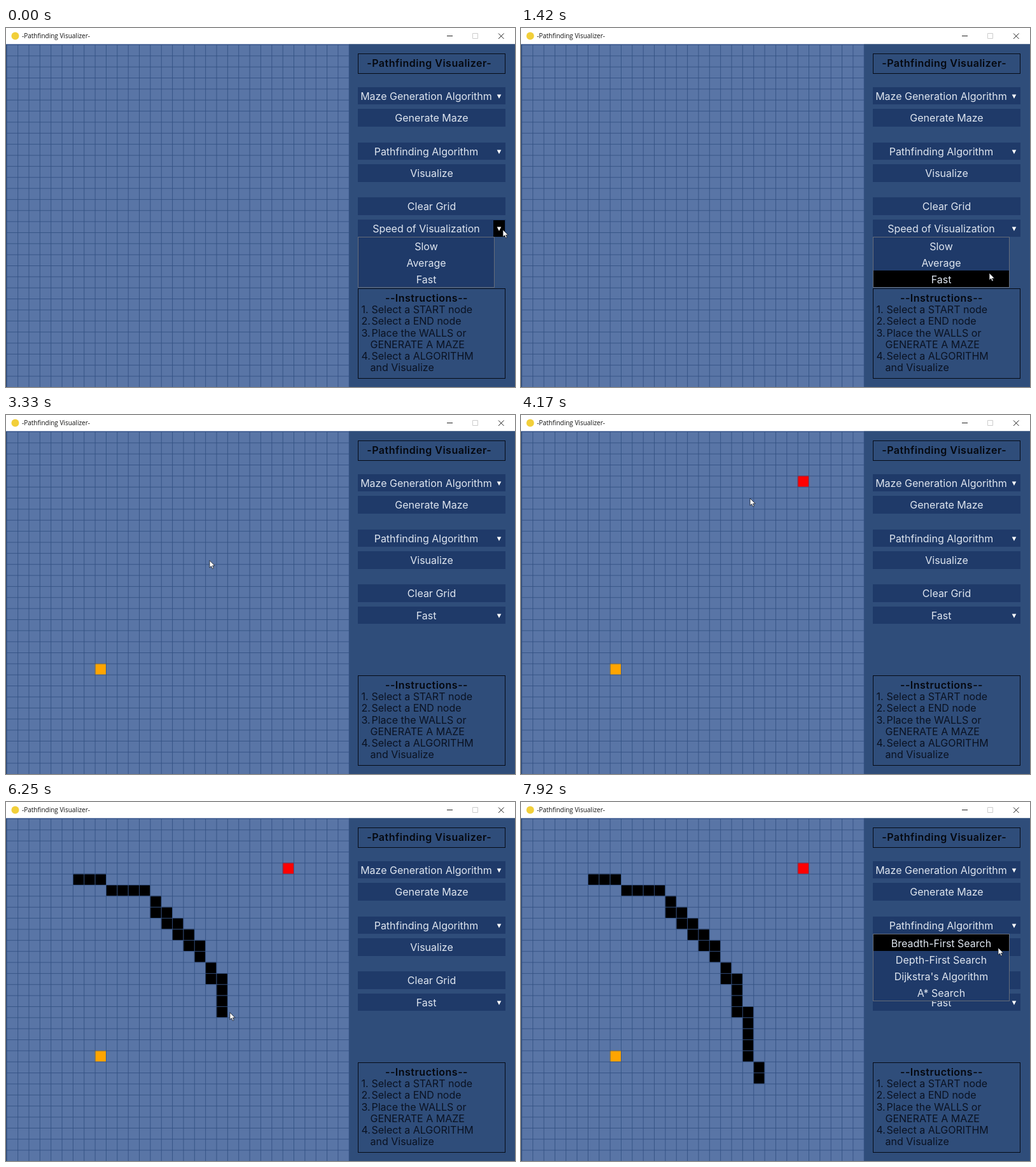
Animation, 800 px wide and 564 px high, one loop 8000 ms. Source, as an HTML page:

```html
<!DOCTYPE html>
<html lang="en">
<head>
<meta charset="utf-8">
<title>Pathfinding Visualizer</title>
<style>
  html, body { margin: 0; width: 100%; height: 100%; overflow: hidden; background: #2f4d7a; }
  svg { display: block; width: 100%; height: 100%; }
  text {
    font-family: Inter, "Open Sans", sans-serif; font-size: 16px; fill: #dfe6f0;
    white-space: pre; font-variant-ligatures: no-contextual;
  }
  .mid { text-anchor: middle; }
  .head { font-weight: 600; fill: #05080f; letter-spacing: .5px; }
  .note { fill: #0a1222; }
  .bar { font-family: "Open Sans", "Noto Sans", sans-serif; font-size: 10px; fill: #111; }
  .crisp { shape-rendering: crispEdges; }
</style>
</head>
<body>
<svg id="stage" viewBox="0 0 800 564"></svg>
<script>
const stage = document.getElementById('stage');
const BUTTON = '#1f3a69', PANEL = '#2f4d7a', LINE = '#335183';
const LEFT = 553, RIGHT = 785, SPLIT = 766, ROW = 26;

function el(tag, attrs, parent = stage) {
  const node = document.createElementNS('http://www.w3.org/2000/svg', tag);
  for (const key in attrs) node.setAttribute(key, attrs[key]);
  return parent.appendChild(node);
}

function rect(x, y, width, height, fill, parent, extra) {
  return el('rect', { x, y, width, height, fill, class: 'crisp', ...extra }, parent);
}

function label(str, x, y, cls = 'mid', parent) {
  const node = el('text', { x, y, class: cls }, parent);
  node.textContent = str;
  return node;
}

function show(node, on) {
  node.setAttribute('visibility', on ? 'visible' : 'hidden');
}

// The app window is 922 wide with cells of 20, scaled to the stage
const SCALE = 800 / 922, COUNT = 31, PITCH = 20 * SCALE;
const gridX = c => SCALE + PITCH * c;
const gridY = r => 30 * SCALE + PITCH * r;

function cell([c, r], fill) {
  return el('rect', { x: gridX(c), y: gridY(r), width: PITCH, height: PITCH, fill });
}

// Wall cells in the order they are drawn
const walls = [];
for (let c = 6; c <= 8; c++) walls.push([c, 5]);
for (let c = 9; c <= 12; c++) walls.push([c, 6]);
const columns = [[7, 8], [8, 9], [9, 10], [10, 11], [11, 12], [13, 14], [14, 17], [17, 21], [22, 23]];
columns.forEach(([top, bottom], i) => {
  for (let r = top; r <= bottom; r++) walls.push([13 + i, r]);
});

rect(0, 0, 800, 564, PANEL);
rect(0, 25, 539, 539, '#5975a6');
const wallCells = walls.map(at => cell(at, '#000'));
const startCell = cell([8, 21], '#ffa500');
const endCell = cell([25, 4], '#ff0000');

let lines = '';
for (let i = 0; i <= COUNT; i++) {
  lines += `M${gridX(i) + SCALE / 2} 26V564M0 ${gridY(i) + SCALE / 2}H539`;
}
el('path', { d: lines, stroke: LINE, 'stroke-width': SCALE, fill: 'none' });
rect(0, 26, 1, 538, '#2c4771');

// Window bar
el('rect', { width: 800, height: 25.2, fill: '#fff' });
el('circle', { cx: 14.5, cy: 12.5, r: 6, fill: '#f2cf3a' });
label('-Pathfinding Visualizer-', 25, 16, 'bar');
el('path', { d: 'M693 12.5H702', stroke: '#222', fill: 'none' });
el('path', { d: 'M733.5 8.5h8v8h-8z', stroke: '#ccc', fill: 'none' });
el('path', { d: 'M774 8.5l8.5 8.5M782.5 8.5l-8.5 8.5', stroke: '#222', fill: 'none' });

// Side panel
function frame(y, height) {
  rect(553.5, y + .5, 231, height, 'none', stage, { stroke: '#060b16' });
}

function button(str, y) {
  rect(LEFT, y, RIGHT - LEFT, 28, BUTTON);
  label(str, 669, y + 20);
}

function dropdown(str, y) {
  rect(LEFT, y, RIGHT - LEFT, 27, BUTTON);
  const hover = rect(SPLIT, y + 1, 18, 26, '#000');
  el('path', { d: `M771.7 ${y + 11.5}h6.6l-3.3 6.5z`, fill: '#fff' });
  return { y, hover, text: label(str, 660.5, y + 19.6) };
}

function menu(items, y) {
  const group = el('g', {});
  rect(LEFT, y, 214, items.length * ROW, BUTTON, group);
  const rows = items.map((str, i) => {
    const hover = rect(LEFT, y + i * ROW, 214, ROW, '#000', group);
    label(str, 660.5, y + i * ROW + 19.5, 'mid', group);
    return hover;
  });
  rect(553.5, y - .5, 214, items.length * ROW + .5, 'none', group, { stroke: '#656c79' });
  return { group, rows, y };
}

frame(40, 31);
label('-Pathfinding Visualizer-', 665.2, 61, 'mid head');
dropdown('Maze Generation Algorithm', 93).hover.remove();
button('Generate Maze', 127);
const finder = dropdown('Pathfinding Algorithm', 180);
button('Visualize', 214);
button('Clear Grid', 266);
const speed = dropdown('Speed of Visualization', 301);

frame(409, 141);
label('--Instructions--', 661, 430, 'mid head');
[
  ['1.', 'Select a START node'],
  ['2.', 'Select a END node'],
  ['3.', 'Place the WALLS or'],
  ['', 'GENERATE A MAZE'],
  ['4.', 'Select a ALGORITHM'],
  ['', 'and Visualize']
].forEach(([num, str], i) => {
  const y = 448 + i * 18.25;
  label(num, 558.5, y, 'note');
  label(str, num ? 574.5 : 572.5, y, 'note');
});

const speedMenu = menu(['Slow', 'Average', 'Fast'], 329);
const finderMenu = menu(['Breadth-First Search', 'Depth-First Search', "Dijkstra's Algorithm", 'A* Search'], 208);
const cursor = el('path', {
  d: 'M0 0V11.2L2.6 8.8 4.4 12.8 6.3 12 4.6 8.2H8.2Z',
  fill: '#fff', stroke: '#10151f', 'stroke-width': .8
});

// Time is counted in ticks, twelve per second
const LOOP = 8000, TICKS = 96;
const PICK_SPEED = 19, PUT_START = 32, PUT_END = 46, OPEN_FINDER = 90;
const DRAW_FROM = 61, DRAW_MID = 67, DRAW_TO = 78;
const path = [
  [0, 781, 317], [3, 779, 321], [9, 750, 358], [13, 738, 382], [17, 736, 385], [20, 736, 387],
  [28, 160, 390], [33, 148, 400], [35, 148, 400], [44, 443, 106], [46, 443, 106],
  [50, 360, 131], [59, 110, 121], [61, 110, 121], [78, 374, 433], [79, 376, 434],
  [85, 728, 241], [88, 774, 198], [91, 775, 197], [95, 750, 229]
];

// Position along the wall: seven cells slowly, then the rest faster
function wallIndex(n) {
  if (n <= DRAW_MID) return n - DRAW_FROM;
  return 6 + (walls.length - 7) * Math.min(1, (n - DRAW_MID) / (DRAW_TO - DRAW_MID));
}

function pointer(n) {
  if (n >= DRAW_FROM && n <= DRAW_TO) {
    const k = wallIndex(n), i = Math.floor(k), f = k - i;
    const a = walls[i], b = walls[Math.min(i + 1, walls.length - 1)];
    return [gridX(a[0] + (b[0] - a[0]) * f + .5), gridY(a[1] + (b[1] - a[1]) * f + .5) + 1];
  }
  let i = 0;
  while (i < path.length - 2 && path[i + 1][0] <= n) i++;
  const [n0, x0, y0] = path[i], [n1, x1, y1] = path[i + 1];
  const u = (n - n0) / (n1 - n0), e = u * u * (3 - 2 * u);
  return [x0 + (x1 - x0) * e, y0 + (y1 - y0) * e];
}

function updateMenu(list, open, x, y) {
  list.group.setAttribute('display', open ? 'inline' : 'none');
  list.rows.forEach((row, i) => {
    const top = list.y + i * ROW;
    row.setAttribute('fill', x >= LEFT && x < 767 && y >= top && y < top + ROW ? '#000' : BUTTON);
  });
}

function updateArrow(box, x, y) {
  show(box.hover, x >= SPLIT && x < RIGHT && y >= box.y && y < box.y + 28);
}

function draw(ms) {
  const n = Math.min(TICKS - 1, Math.floor((ms + 3.5) * TICKS / LOOP));
  const [x, y] = pointer(n);
  cursor.setAttribute('transform', `translate(${x.toFixed(1)} ${y.toFixed(1)})`);
  speed.text.textContent = n < PICK_SPEED ? 'Speed of Visualization' : 'Fast';
  updateMenu(speedMenu, n < PICK_SPEED, x, y);
  updateMenu(finderMenu, n >= OPEN_FINDER, x, y);
  updateArrow(speed, x, y);
  updateArrow(finder, x, y);
  show(startCell, n >= PUT_START);
  show(endCell, n >= PUT_END);
  const drawn = wallIndex(n);
  wallCells.forEach((node, i) => show(node, i <= drawn));
}

const begin = performance.now();
function tick() {
  draw((performance.now() - begin) % LOOP);
  requestAnimationFrame(tick);
}
tick();
</script>
</body>
</html>
```
